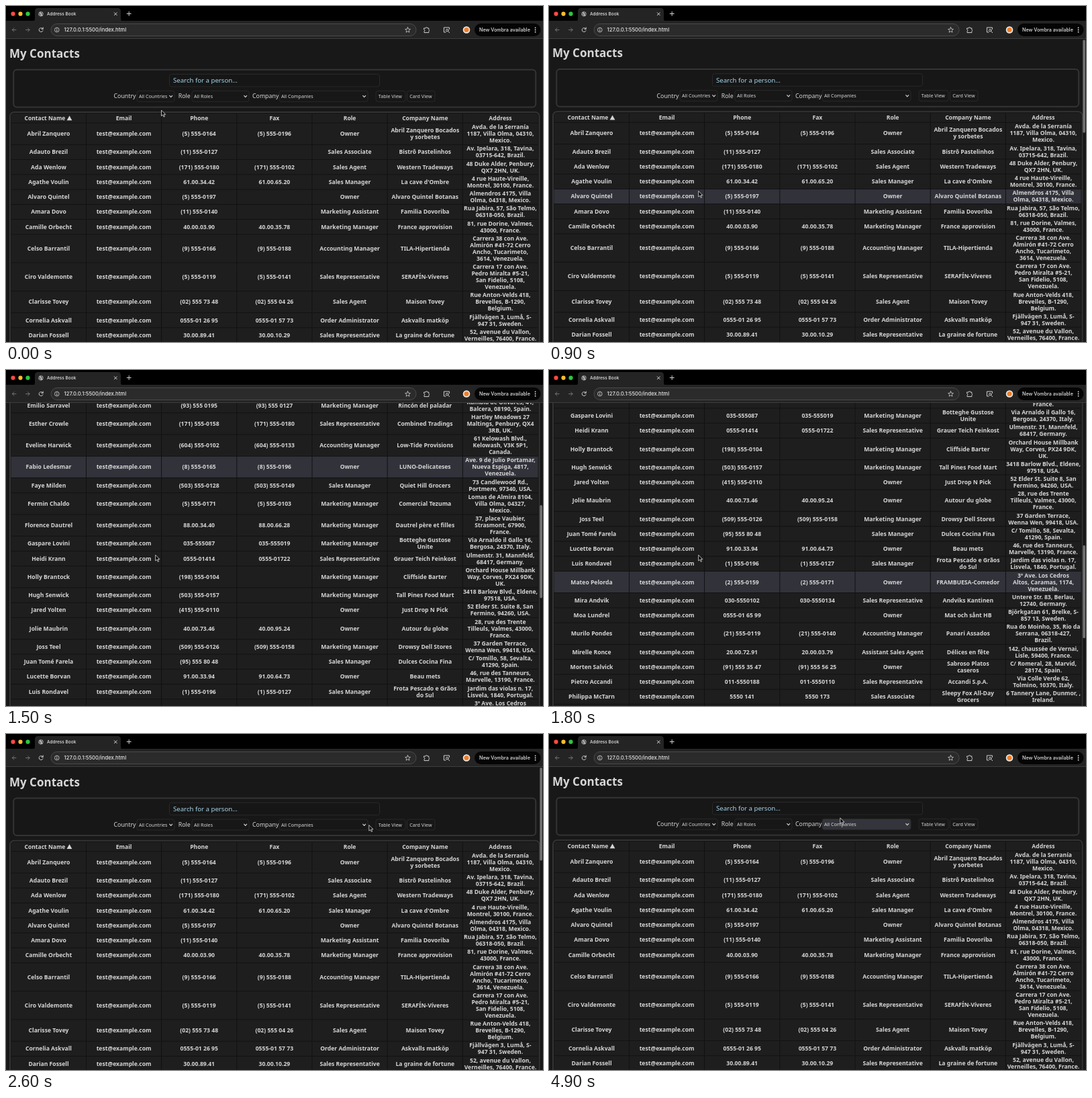
An HTML page for the animation above (5 s loop, 800 px wide and 500 px high).

```html
<!DOCTYPE html>
<html lang="en">
<head>
<meta charset="utf-8">
<title>Address Book</title>
<style>
html, body { margin: 0; width: 100%; height: 100%; overflow: hidden; background: #181818; }
svg { display: block; width: 800px; height: 500px; }
text { font-family: "Noto Sans", "Open Sans", sans-serif; fill: #d6d6d6; white-space: pre; }
.ui { font-family: Inter, "Liberation Sans", sans-serif; fill: #e8e8e8; }
.line { fill: none; stroke: #d0d0d0; stroke-width: 1; stroke-linecap: round; stroke-linejoin: round; }
</style>
</head>
<body>
<svg id="stage" viewBox="0 0 800 500" xmlns="http://www.w3.org/2000/svg"></svg>
<script>
const LOOP = 5000;
const LINE = 10, PAD = 2.25, FIRST_ROW = 174;
const COLS = [7.5, 119.5, 231.6, 343.8, 456, 568.2, 680.4, 792.5];
const EMAIL = 'test@example.com';
const ROLES = {
  O: 'Owner', SA: 'Sales Associate', SG: 'Sales Agent', SM: 'Sales Manager', SR: 'Sales Representative',
  MA: 'Marketing Assistant', MM: 'Marketing Manager', AM: 'Accounting Manager',
  OA: 'Order Administrator', AS: 'Assistant Sales Agent'
};

// name | phone pattern (* = no fax) | role | company | address; a slash without a space breaks the line
const CONTACTS = `Abril Zanquero|(5) 555-01##|O|Abril Zanquero Bocados/y sorbetes|Avda. de la Serranía/1187, Villa Olma, 04310,/Mexico.
Adauto Brezil|*(11) 555-01##|SA|Bistrô Pastelinhos|Av. Ipelara, 318, Tavina,/03715-642, Brazil.
Ada Wenlow|(171) 555-01##|SG|Western Tradeways|48 Duke Alder, Penbury,/QX7 2HN, UK.
Agathe Voulin|61.00.##.##|SM|La cave d'Ombre|4 rue Haute-Vireille,/Montrel, 30100, France.
Alvaro Quintel|*(5) 555-01##|O|Alvaro Quintel Botanas|Almendros 4175, Villa/Olma, 04318, Mexico.
Amara Dovo|*(11) 555-01##|MA|Familia Dovoriba|Rua Jabira, 57, São Telmo,/06318-050, Brazil.
Camille Orbecht|40.00.##.##|MM|France approvision|81, rue Dorine, Valmes,/43000, France.
Celso Barrantil|(9) 555-01##|AM|TILA-Hipertienda|Carrera 38 con Ave./Almirón #41-72 Cerro/Ancho, Tucarimeto,/3614, Venezuela.
Ciro Valdemonte|(5) 555-01##|SR|SERAFÍN-Víveres|Carrera 17 con Ave./Pedro Miralta #5-21,/San Fidelio, 5108,/Venezuela.
Clarisse Tovey|(02) 555 ## ##|SG|Maison Tovey|Rue Anton-Velds 418,/Brevelles, B-1290,/Belgium.
Cornelia Askvall|0555-01 ## ##|OA|Askvalls matköp|Fjällvägen 3, Lumå, S-/947 31, Sweden.
Darian Fossell|30.00.##.##|SR|La graine de fortune|52, avenue du Vallon,/Verneilles, 76400, France.
Delio Marn|(91) 555 ## ##|AM|VELSA Conservas Inter./Embutidos S.A.|C/ Peñarzal, 64,/Marvid, 28170, Spain.
Emilio Sarravel|(93) 555 01##|MM|Rincón del paladar|Rambla de Olivares, 41,/Balcera, 08190, Spain.
Esther Crowle|(171) 555-01##|SR|Combined Tradings|Hartley Meadows 27/Maltings, Penbury, QX4/3RB, UK.
Eveline Harwick|(604) 555-01##|AM|Low-Tide Provisions|61 Kelowash Blvd.,/Kelowash, V3K 5P1,/Canada.
Fabio Ledesmar|(8) 555-01##|O|LUNO-Delicateses|Ave. 9 de Julio Portamar,/Nueva Espiga, 4817,/Venezuela.
Faye Milden|(503) 555-01##|SM|Quiet Hill Grocers|73 Candlewood Rd.,/Portmere, 97340, USA.
Fermin Chaldo|(5) 555-01##|MM|Comercial Tezuma|Lomas de Almira 8104,/Villa Olma, 04327,/Mexico.
Florence Dautrel|88.00.##.##|MM|Dautrel père et filles|37, place Vaubier,/Strasmont, 67900,/France.
Gaspare Lovini|035-5550##|MM|Botteghe Gustose/Unite|Via Arnaldo il Gallo 16,/Bergosa, 24370, Italy.
Heidi Krann|0555-01###|SR|Grauer Teich Feinkost|Ulmenstr. 31, Mannfeld,/68417, Germany.
Holly Brantock|*(198) 555-01##|MM|Cliffside Barter|Orchard House Millbank/Way, Corves, PX24 9DK,/UK.
Hugh Senwick|*(503) 555-01##|MM|Tall Pines Food Mart|3418 Barlow Blvd., Eldene,/97518, USA.
Jared Yolten|*(415) 555-01##|O|Just Drop N Pick|52 Elder St. Suite 8, San/Fermino, 94260, USA.
Jolie Maubrin|40.00.##.##|O|Autour du globe|28, rue des Trente/Tilleuls, Valmes, 43000,/France.
Joss Teel|(509) 555-01##|MM|Drowsy Dell Stores|37 Garden Terrace,/Wenna Wen, 99418, USA.
Juan Tomé Farela|*(95) 555 ## ##|SM|Dulces Cocina Fina|C/ Tomillo, 58, Sevalta,/41290, Spain.
Lucette Borvan|91.00.##.##|O|Beau mets|46, rue des Tanneurs,/Marvelle, 13190, France.
Luis Rondavel|(1) 555-01##|SM|Frota Pescado e Grãos/do Sul|Jardim das violas n. 17,/Lisvela, 1840, Portugal.
Mateo Pelorda|(2) 555-01##|O|FRAMBUESA-Comedor|3ª Ave. Los Cedros/Altos, Caramas, 1174,/Venezuela.
Mira Andvik|030-55501##|SR|Andviks Kantinen|Untere Str. 83, Berlau,/12740, Germany.
Moa Lundrel|*0555-01 ## ##|O|Mat och sånt HB|Björkgatan 61, Brelke, S-/857 13, Sweden.
Murilo Pondes|(21) 555-01##|AM|Panari Assados|Rua do Moinho, 35, Rio da/Serrana, 06318-427,/Brazil.
Mirelle Ronce|20.00.##.##|AS|Délices en fête|142, chaussée de Vernai,/Lisle, 59400, France.
Morten Salvick|(91) 555 ## ##|O|Sabroso Platos/caseros|C/ Romeral, 28, Marvid,/28174, Spain.
Pietro Accandi|011-55501##|SR|Accandi S.p.A.|Via Colle Verde 62,/Tolmino, 10370, Italy.
Philippa McTarn|5550 1##|SA|Sleepy Fox All-Day/Grocers|6 Tannery Lane, Dunmor, ,/Ireland.
Pablo Simbrel|(1) 555-01##|SG|Nopal Comidas para/viajar|Molinos 418, Buena Vega,/1240, Argentina.
Paula Perrick|(5) 555-01##|SR|Paula Perrick Antojos|Calle Dr. Luna Mora 31,/Villa Olma, 04351, Mexico.
Pascale Cartrin|(071) 55 01 ##|AM|Mets suprêmes|Boulevard Tivel, 148,/Charlevoy, B-6240,/Belgium.
Petra Frenkold|089-55501##|MM|Frenkolds Versand|Lindenplatz 27, Münchau,/80940, Germany.
Philip Cramlow|0555-01###|SA|Königlich Speisen|Talweg 14, Brandenau,/14920, Germany.
Pirko Koskelo|981-5550##|AM|Vartio Herkku|Torvikatu 71, Oulola,/90640, Finland.
Rene Phillow|(907) 555-01##|SR|Old Tundra Larder|3184 Birch St., Anchor/Bay, 99740, USA.`
  .split('\n').map((row, i) => {
    const [name, pattern, role, company, address] = row.split('|');
    const plain = pattern.replace('*', '');
    const lines = s => s.split(/\/(?! )/);
    return {
      name, role: ROLES[role], company: lines(company), address: lines(address),
      phone: digits(plain, i * 2 + 1), fax: pattern === plain ? digits(plain, i * 2 + 2) : ''
    };
  });
let nextY = FIRST_ROW;
for (const c of CONTACTS) {
  c.y = nextY;
  c.h = LINE * Math.max(c.company.length, c.address.length) + PAD;
  nextY += c.h;
}
const tableEnd = nextY;

function digits(pattern, seed) {
  let n = seed * 7919 + 13;
  return pattern.replace(/#/g, () => (n = (n * 1103 + 12345) % 65536, Math.floor(n / 6553.6)));
}

// Markup helpers
const rect = (x, y, w, h, fill, extra = '') =>
  `<rect x="${x}" y="${y}" width="${w}" height="${h}" fill="${fill}" ${extra}/>`;
const circle = (x, y, r, fill, extra = '') => `<circle cx="${x}" cy="${y}" r="${r}" fill="${fill}" ${extra}/>`;
const path = (d, extra = 'class="line"') => `<path d="${d}" ${extra}/>`;
const text = (x, y, size, str, extra = '') => `<text x="${x}" y="${y}" font-size="${size}" ${extra}>${str}</text>`;
const bold = 'font-weight="700"';

function cell(col, cy, lines) {
  const x = (COLS[col] + COLS[col + 1]) / 2;
  return lines.map((s, i) =>
    text(x, cy + 3.1 + (i - (lines.length - 1) / 2) * LINE, 8.6, s, bold + ' text-anchor="middle"')).join('');
}

function browserBar() {
  const ui = (x, y, size, s) => text(x, y, size, s, 'class="ui" font-weight="500"');
  return rect(0, 0, 800, 23, '#000') +
    path('M39 23Q43 23 43 19V8Q43 3 48 3H166Q171 3 171 8V19Q171 23 175 23Z', 'fill="#242424"') +
    rect(0, 22, 800, 26.5, '#242424') + rect(0, 48, 800, 1, '#3d3d3d') +
    circle(10.5, 11.7, 3.1, '#fc4a43') + circle(21.5, 11.7, 3.1, '#fdbc2e') + circle(32.5, 11.7, 3.1, '#2bc840') +
    circle(52, 11.8, 3.6, '#a9abae') + path('M49.5 10.5Q51.5 13 50.5 14.5M52 9Q54.5 10 54.5 13', 'fill="none" stroke="#303030"') +
    ui(61, 14.2, 6.5, 'Address Book') +
    path('M161.3 9.8l4 4m0-4l-4 4') + path('M180.2 11.5h6m-3-3v6') +
    path('M15 35.5H9.5m2.5-2.7l-2.7 2.7 2.7 2.7', 'class="line" style="stroke:#737373"') +
    path('M29.5 35.5H35m-2.5-2.7l2.7 2.7-2.7 2.7', 'class="line" style="stroke:#737373"') +
    path('M54.8 34A3 3 0 1 0 55 36.7M55.2 32v2.3h-2.3') +
    rect(67, 26.5, 544, 18, '#2b2b2b', 'rx="9" stroke="#4a4a4a" stroke-width="1"') +
    circle(75.8, 35.5, 3.3, 'none', 'stroke="#c8c8c8" stroke-width=".9"') + path('M75.8 35.2v2M75.8 33.6v.1') +
    ui(86.5, 38.3, 7.7, '127.0.0.1:5500/index.html') +
    path('M598.5 31.7l1.1 2.6 2.8.2-2.1 1.9.6 2.8-2.4-1.5-2.4 1.5.6-2.8-2.1-1.9 2.8-.2Z', 'class="line" style="stroke-width:.8"') +
    path('M623 33h2.2a1.3 1.3 0 0 1 2.6 0h2v2.2a1.3 1.3 0 0 1 0 2.4v2H623v-2.2a1.2 1.2 0 0 0 0-2.3Z') +
    path('M655 39h-2.6v-7h8v2.5') + circle(657.2, 36.2, 1.7, 'none', 'class="line"') + path('M658.7 37.7l2 2') +
    circle(686, 35.5, 5.3, '#efe9e2') + circle(686, 35.5, 3.6, '#ee7f2d') +
    rect(698, 26, 98.5, 19, '#050505', 'rx="9.5"') + ui(705, 38.1, 7.15, 'New Vombra available') +
    [32.3, 35.5, 38.7].map(y => circle(788.6, y, .9, '#eee')).join('');
}

const CONTROLS = [
  { x: 195, w: 56, label: 'All Countries', select: true },
  { x: 277, w: 85, label: 'All Roles', select: true },
  { x: 407, w: 132, label: 'All Companies', select: true },
  { x: 551, w: 44, label: 'Table View' },
  { x: 597.5, w: 41.5, label: 'Card View' }
];
const CTRL_Y = 126.3, CTRL_H = 16;

function controlPanel() {
  return text(5, 77, 17, 'My Contacts', bold) +
    rect(11.2, 94.8, 778, 55.6, '#171717', 'rx="5" stroke="#343434" stroke-width="2"') +
    rect(243.5, 101.5, 313, 18.5, '#161616', 'rx="3" stroke="#292929"') +
    text(249, 114.4, 9.65, 'Search for a person...', 'style="fill:#a5d5ea"') +
    [[160.5, 'Country'], [256.7, 'Role'], [367, 'Company']].map(([x, s]) => text(x, 137.4, 8.8, s)).join('') +
    CONTROLS.map(c =>
      rect(c.x, CTRL_Y, c.w, CTRL_H, '#171717', 'class="ctrl" rx="3" stroke="#292929"') +
      text(c.x + (c.select ? 2.9 : 3.8), 137.2, 7.15, c.label) +
      (c.select ? path(`M${c.x + c.w - 7.3} 133.4l2 2.2 2-2.2`, 'class="line" style="stroke-width:1.2"') : '')).join('');
}

function tableView() {
  const h = tableEnd - 160.5;
  const gap = 'fill="none" stroke="#121212" stroke-width="1"';
  const heads = ['', 'Email', 'Phone', 'Fax', 'Role', 'Company Name', 'Address'];
  return rect(6, 158, 788.5, h + 5, '#121212', 'rx="6" stroke="#333" stroke-width="2"') +
    rect(7.5, 160, 785, h, '#1e1e1e', 'rx="4"') +
    rect(7.5, 0, 785, 22, '#31323a', 'id="rowHover"') +
    path(COLS.slice(1, -1).map(x => `M${x} 160v${h}`).join('') +
      CONTACTS.map(c => `M7.5 ${c.y}h785`).join(''), gap) +
    text(58, 170, 8.5, 'Contact Name', bold + ' text-anchor="middle"') +
    path('M94.5 163.2l3.9 7h-7.8Z', 'fill="#d6d6d6"') +
    heads.map((s, i) => cell(i, 166.9, [s])).join('') +
    CONTACTS.map(c => [[c.name], [EMAIL], [c.phone], [c.fax], [c.role], c.company, c.address]
      .map((lines, i) => cell(i, c.y + c.h / 2, lines)).join('')).join('');
}

function card(c, y) {
  return `<g transform="translate(0 ${y})">` +
    rect(185.5, 0, 429, 210.3, '#323232', 'rx="6"') +
    '<g transform="translate(257.6 79.5)" clip-path="url(#disc)">' + circle(0, 0, 55.5, '#4a5577') +
    path('M-22-16C-24-47 24-47 22-16C25-12 22-2 19-1C17 8 14 13 12 16V20C14 30 36 29 41 43V60H-41V43' +
      'C-36 29-14 30-12 20V16C-14 13-17 8-19-1C-22-2-25-12-22-16Z', 'fill="#e1e7ea"') + '</g>' +
    text(341, 45, 17, c.name, bold) +
    [c.role, c.company.join(' '), c.address.join(' ')].map((s, i) => text(341, 78 + i * 27.8, 8.5, s)).join('') +
    circle(210.5, 177, 8.6, '#050505') +
    path('M206 174h9v6.3h-9zl4.5 3.6 4.5-3.6', 'fill="none" stroke="#3c3c3c" stroke-width="1"') +
    text(224.5, 180.5, 10.1, EMAIL, bold) +
    path('M330.5 169.5l3-1.2 3 5-2 2q2 4 5.5 5.8l2.3-1.8 4 3.2-1.5 2.8q-3 1-7-1.3-7.5-5-8.5-12Z', 'fill="#050505"') +
    text(350.8, 180.2, 8.7, c.phone) +
    path('M415 169h11v4h-11zM412.3 174h16.4v8h-2.7v-3h-11v3h-2.7zM416 180h9v4.5h-9z', 'fill="#050505"') +
    text(434, 180.2, 8.7, c.fax) + '</g>';
}

const stage = document.getElementById('stage');
stage.innerHTML = '<defs><clipPath id="view"><rect y="49" width="800" height="451"/></clipPath>' +
  '<clipPath id="disc"><circle r="55.5"/></clipPath></defs>' +
  rect(0, 0, 800, 500, '#181818') +
  `<g clip-path="url(#view)"><g id="page">${controlPanel()}<g id="table">${tableView()}</g>` +
  `<g id="cards">${card(CONTACTS.find(c => c.name === 'Mira Andvik'), 156.7)}${card(CONTACTS[0], 376.1)}</g></g>` +
  rect(795.3, 50, 3.6, 138.5, '#747474', 'id="thumb" rx="1.8"') + '</g>' + browserBar() +
  path('M0 0V8.6L2 6.8 3.5 10 4.9 9.4 3.5 6.3H6.2Z', 'id="cursor" fill="#050505" stroke="#e6e6e6" stroke-width=".8"');
const $ = id => document.getElementById(id);
const page = $('page'), table = $('table'), cards = $('cards'), rowHover = $('rowHover');
const thumb = $('thumb'), cursor = $('cursor'), ctrls = [...document.querySelectorAll('.ctrl')];

// Page offset sampled every 100 ms from 700 ms, joined by cubic curves
const SCROLL = [0, 0.1, 0.7, 5, 22, 62, 121, 280, 480, 640, 715, 673, 540, 400, 270, 150, 60, 12, 0, -0.7, -0.3, 0];
function scrollAt(t) {
  const p = (t - 700) / 100, i = Math.floor(p), u = p - i;
  const at = k => SCROLL[k] || 0;
  const a = at(i), b = at(i + 1), m = (b - at(i - 1)) / 2, n = (at(i + 2) - a) / 2;
  return a + u * (m + u * (3 * (b - a) - 2 * m - n + u * (2 * (a - b) + m + n)));
}

const MOVES = [
  [0, 231.5, 155], [400, 222.7, 275.3], [2420, 222.7, 275.3], [2600, 540.8, 135.5], [3050, 617, 135],
  [3350, 617, 135], [3650, 567.7, 134.5], [3950, 567.7, 134.5], [4200, 548, 136], [4480, 300, 133],
  [4780, 437, 127], [4900, 433.8, 124.8], [5000, 433.8, 124.8]
];
function pointerAt(t) {
  const i = MOVES.findIndex(m => m[0] > t);
  const [t0, x0, y0] = MOVES[i - 1], [t1, x1, y1] = MOVES[i];
  const u = (t - t0) / (t1 - t0), e = u * u * (3 - 2 * u);
  return [x0 + (x1 - x0) * e, y0 + (y1 - y0) * e];
}

const show = (el, on) => el.setAttribute('visibility', on ? 'visible' : 'hidden');

function draw(t) {
  const s = scrollAt(t), [x, y] = pointerAt(t);
  const inCards = t >= 3200 && t < 3850;
  page.setAttribute('transform', `translate(0 ${-s})`);
  show(table, !inCards);
  show(cards, inCards);

  // Row highlight trails the scrolling slightly
  const hitY = y + scrollAt(t - 70);
  const row = !inCards && CONTACTS.find(c => hitY >= c.y && hitY < c.y + c.h);
  show(rowHover, row);
  if (row) {
    rowHover.setAttribute('y', row.y);
    rowHover.setAttribute('height', row.h);
  }
  ctrls.forEach((el, i) => {
    const c = CONTROLS[i];
    const over = x >= c.x && x <= c.x + c.w && hitY >= CTRL_Y - 2 && hitY <= CTRL_Y + CTRL_H;
    el.setAttribute('fill', over ? '#34353c' : '#171717');
  });

  thumb.setAttribute('y', 50 + Math.max(0, s) * 0.3135);
  thumb.setAttribute('opacity', t < 700 ? 0 : Math.max(0, Math.min(1, (2950 - t) / 200)));
  cursor.setAttribute('transform', `translate(${x} ${y})`);
}

function tick() {
  draw(performance.now() % LOOP);
  requestAnimationFrame(tick);
}
tick();
</script>
</body>
</html>
```
